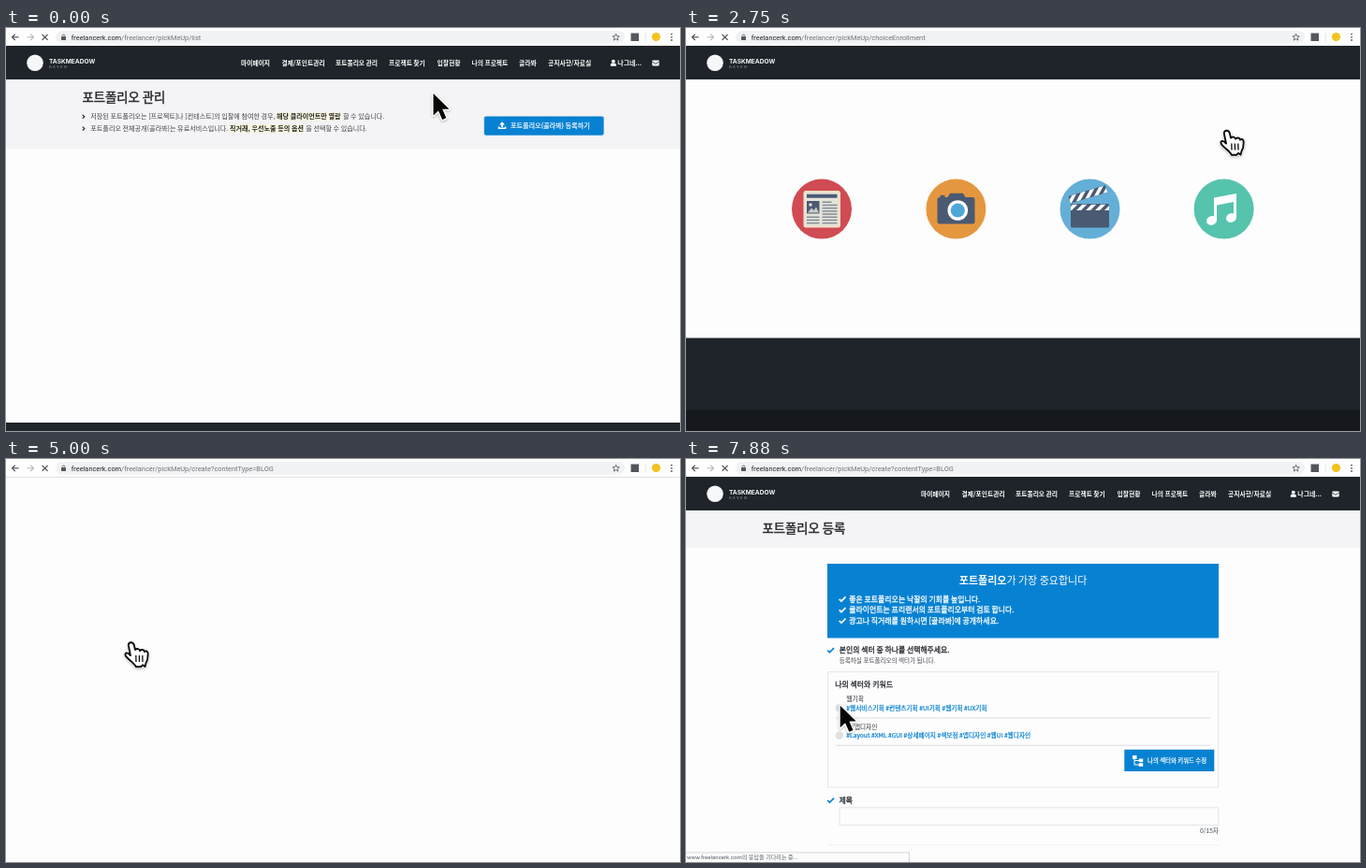
Recreate the animation shown at these times as an HTML page with a canvas. Size 720x431 px, loop 8 s.

```html
<!DOCTYPE html>
<html lang="ko">
<head>
<meta charset="utf-8">
<title>포트폴리오 등록</title>
<style>
html, body { margin: 0; width: 100%; height: 100%; overflow: hidden; background: #fdfdfe; }
canvas { display: block; width: 720px; height: 431px; }
</style>
</head>
<body>
<canvas id="stage"></canvas>
<script>
const W = 720, H = 431, LOOP = 8000, STEP = 125;
const KR = '"Noto Sans CJK KR", "Noto Sans CJK", sans-serif';
const UI = 'Roboto, "Noto Sans CJK KR", sans-serif';
const PAPER = '#fdfdfe', DARK = '#1e2429', BLUE = '#0782d2', INK = '#25282c', SLATE = '#4a5a73';

const canvas = document.getElementById('stage');
const c = canvas.getContext('2d');
const ratio = window.devicePixelRatio || 1;
canvas.width = W * ratio;
canvas.height = H * ratio;

// ---- helpers ----
function rect(x, y, w, h, fill, r = 0) {
  c.fillStyle = fill;
  c.beginPath();
  c.roundRect(x, y, w, h, r);
  c.fill();
}
function frame(x, y, w, h, color) {
  c.strokeStyle = color;
  c.lineWidth = 1;
  c.strokeRect(x, y, w, h);
}
function disc(x, y, r, fill) {
  c.fillStyle = fill;
  c.beginPath();
  c.arc(x, y, r, 0, 7);
  c.fill();
}
function line(color, width, ...p) {
  c.strokeStyle = color;
  c.lineWidth = width;
  c.beginPath();
  for (let i = 0; i < p.length; i += 2) c.lineTo(p[i], p[i + 1]);
  c.stroke();
}
function poly(fill, ...p) {
  c.fillStyle = fill;
  c.beginPath();
  for (let i = 0; i < p.length; i += 2) c.lineTo(p[i], p[i + 1]);
  c.closePath();
  c.fill();
}
// y is the optical middle of the line; returns the text width
function text(s, x, y, size, color = INK, weight = 400, align = 'left', family = KR) {
  c.font = `${weight} ${size}px ${family}`;
  c.textAlign = align;
  c.fillStyle = color;
  c.fillText(s, x, y + size * 0.38);
  if (weight === 500) { // no medium cut is installed: thicken the regular one
    c.strokeStyle = color;
    c.lineWidth = size * 0.035;
    c.strokeText(s, x, y + size * 0.38);
  }
  return c.measureText(s).width;
}
const chevron = (x, y, color) => line(color, 1.2, x - 1, y - 2, x + 1, y, x - 1, y + 2);
const check = (x, y, color) => line(color, 1.7, x - 3.3, y, x - 1, y + 2.3, x + 3.5, y - 2.4);
const clamp = v => Math.max(0, Math.min(1, v));
const ease = v => { v = clamp(v); return v * v * (3 - 2 * v); };

// ---- browser bar ----
function browser(path) {
  rect(0, 0, W, 19, '#fefefe');
  rect(53, 3, 608, 13.5, '#f0f2f4', 7);
  rect(0, 19, W, 1, '#dfe0e3');
  for (const [x, d, color] of [[10, 1, '#45494d'], [26, -1, '#b5b7ba']]) {
    line(color, 1.1, x - 3.5, 9.8, x + 3.5, 9.8);
    line(color, 1.1, x - 0.3 * d, 6.6, x - 3.4 * d, 9.8, x - 0.3 * d, 13);
  }
  line('#45494d', 1.1, 38.6, 6.8, 44.6, 12.8);
  line('#45494d', 1.1, 44.6, 6.8, 38.6, 12.8);
  rect(59, 9, 5, 4, '#55595d', 0.6);
  c.strokeStyle = '#55595d';
  c.lineWidth = 0.9;
  c.beginPath();
  c.arc(61.5, 8.6, 1.5, Math.PI, 0);
  c.stroke();
  const w = text('freelancerk.com', 69.7, 9.7, 7.42, '#202327', 400, 'left', UI);
  text('/freelancer/pickMeUp/' + path, 69.7 + w, 9.7, 7.42, '#70757a', 400, 'left', UI);
  c.strokeStyle = '#5c6064';
  c.lineWidth = 0.9;
  c.beginPath();
  for (let i = 0; i < 10; i++) {
    const a = i * Math.PI / 5 - Math.PI / 2, r = i % 2 ? 1.7 : 3.8;
    c.lineTo(651.6 + r * Math.cos(a), 10 + r * Math.sin(a));
  }
  c.closePath();
  c.stroke();
  rect(667.5, 5.5, 8.5, 8.5, '#54575b');
  rect(682.8, 5.5, 0.7, 9, '#d8dadd');
  disc(694.5, 9.6, 4.6, '#f3c21f');
  for (const y of [6.6, 9.8, 13]) disc(711, y, 0.9, '#505458');
}

function status(s, alpha = 1) {
  c.globalAlpha = alpha;
  rect(0, 420.5, 239, 11, '#c9cbce', 1);
  rect(0, 421.2, 238.2, 10, '#fcfcfd', 1);
  text(s + '의 응답을 기다리는 중...', 1, 426, 6.08, '#55585c', 400, 'left', UI);
  c.globalAlpha = 1;
}

// ---- site header and footer ----
const MENU = [['마이페이지', 251], ['결제/포인트관리', 294.5], ['포트폴리오 관리', 352], ['프로젝트 찾기', 409],
  ['입찰현황', 460.5], ['나의 프로젝트', 497.5], ['골라봐', 548], ['공지사항/자료실', 579]];

function header(nav) {
  rect(0, 19, W, 36, DARK);
  disc(31, 37.3, 8.8, '#f6f7f8');
  text('TASKMEADOW', 46, 35.4, 6.6, '#f4f5f6', 700, 'left', 'Inter, sans-serif');
  c.letterSpacing = '1.8px';
  text('HAVEN', 46, 41.4, 3.4, '#a9adb1', 400, 'left', 'Inter, sans-serif');
  c.letterSpacing = '0px';
  if (!nav) return;
  for (const [s, x] of MENU) text(s, x, 37.6, 6.75, '#fff', 700);
  disc(648.8, 35.6, 1.9, '#fff');
  rect(645.8, 37.6, 6, 3.2, '#fff', [1.8, 1.8, 0.5, 0.5]);
  text('나그네...', 653.3, 37.6, 6.9, '#fff', 700);
  rect(690.3, 34.6, 7.4, 5.8, '#fff', 0.8);
  line(DARK, 0.8, 690.3, 36, 694, 38.4, 697.7, 36);
}

const GREY = '#7d8185';

function footer(full) {
  rect(0, 331.4, W, 99.6, DARK);
  rect(0, 408.5, W, 22.5, '#15191d');
  if (!full) return;
  text('CONTACT', 164.5, 345.3, 7.3, '#f0f1f2', 700, 'center');
  text('"별빛일손나누리"는', 360, 345.3, 7.2, '#f0f1f2', 700, 'center');
  text('안심맡김계좌', 555.5, 345.3, 7.3, '#f0f1f2', 700, 'center');
  ['대표이사 : 도담솔', '주소 : 한별시 나래들구 푸른솔길로 5길21 3층', 'voc : 0000-0000(운영시간 10:00 ~ 17:00 한국시각)']
    .forEach((s, i) => {
      chevron(75, 361.8 + i * 9, GREY);
      text(s, 80, 361.8 + i * 9, 6.35, GREY);
    });
  ['별빛일손나누리는 법에 의해 보호받는 (주)가람나루이음결새벽들마루', '소리의 등록상표입니다.', '사업자등록번호 : 000-00-00000']
    .forEach((s, i) => text(s, 270, 361.8 + i * 9, 6.3, GREY));
  text('HN한들은행 000000-00-000000', 556, 361.8, 6.3, GREY, 400, 'center');
  text('계좌주 : (주)가람나루이음결새벽들마루소리', 556, 370.8, 6.3, GREY, 400, 'center');
  for (let i = 0; i < 4; i++) rect(336.5 + i * 13.5, 389, 8.5, 8.5, '#a4a7aa', 1);
  disc(81, 421, 6, '#63676b');
  text('TASKMEADOW', 92, 420.5, 5.6, '#63676b', 700, 'left', 'Inter, sans-serif');
  text('Copyright © 2019 GN Meadows & Brookside Co.,Ltd. All Rights Reserved', 356, 421.5, 5.7, '#565a5f', 400, 'right');
  for (const [s, x, mark] of [['에스크로서비스', 479, 521.5], ['개인정보보호정책', 528.5, 576.5], ['이용약관', 583, 609.5], ['회원탈퇴', 616.5, 644.5]]) {
    text(s, x, 421.5, 5.8, '#f0f1f2', 700);
    chevron(mark, 421.5, '#f0f1f2');
  }
}

// ---- pages ----
function listPage(hover) {
  rect(0, 55, W, 74.5, '#f4f3f5');
  header(true);
  text('포트폴리오 관리', 81.5, 74.2, 13.3, INK, 500);
  chevron(82.8, 94.8, INK);
  chevron(82.8, 107.6, INK);
  rect(288, 90.3, 70, 9, '#fcf7df');
  rect(238, 103, 80, 9, '#fcf7df');
  const body = '#3f4347';
  text('저장된 포트폴리오는 [프로젝트]나 [컨테스트]의 입찰에 참여한 경우,', 90.3, 94.6, 7.1, body);
  text('해당 클라이언트만 열람', 289, 94.6, 7.1, INK, 700);
  text('할 수 있습니다.', 360, 94.6, 7.1, body);
  text('포트폴리오 전체공개(골라봐)는 유료서비스입니다.', 90.3, 107.4, 7.1, body);
  text('직거래, 우선노출 등의 옵션', 239, 107.4, 7.1, INK, 700);
  text('을 선택할 수 있습니다.', 320.3, 107.4, 7.1, body);
  const mix = (a, b) => Math.round(a + (b - a) * hover);
  rect(510.8, 94.4, 127.8, 20.4, `rgb(${mix(7, 10)},${mix(130, 153)},${mix(210, 246)})`, 2);
  poly('#fff', 530, 100.3, 533, 103.6, 531, 103.6, 531, 106, 529, 106, 529, 103.6, 527, 103.6);
  line('#fff', 1.5, 526.5, 105.5, 526.5, 107.3, 533.5, 107.3, 533.5, 105.5);
  text('포트폴리오(골라봐) 등록하기', 539, 104.2, 7.1, '#fff', 500);
  rect(0, 422, W, 9, DARK);
}

function newsIcon() {
  rect(125.5, 174, 39.5, 39.5, '#efe0c4', 2.5);
  rect(127.5, 176, 35.5, 35.5, '#e6e3da', 1);
  rect(129, 177.8, 32.5, 4, SLATE);
  rect(129, 185, 13.5, 13.5, SLATE);
  disc(133, 189, 1.7, '#efe5d0');
  poly('#c9cbc8', 130, 197.5, 134, 192.5, 136.5, 195, 139, 191.5, 142, 197.5);
  for (let i = 0; i < 8; i++) {
    const y = 185.5 + i * 3.2;
    rect(145.5, y, i === 0 ? 10 : 16, 1.5, '#818c97');
    if (i > 4) rect(129, y, 13.5, 1.5, '#818c97');
  }
}
function cameraIcon() {
  rect(268.5, 181, 40, 28.5, SLATE, 2.5);
  poly(SLATE, 279, 182, 282, 176.8, 296, 176.8, 299, 182);
  rect(271.5, 178.8, 5, 3, SLATE);
  disc(290.3, 195, 10.8, '#fff');
  disc(290.3, 195, 7.6, '#4fa7d8');
}
function stripes(y, h) {
  c.save();
  c.beginPath();
  c.rect(0, y, 41, h);
  c.clip();
  for (let x = -4; x < 44; x += 10) poly('#fff', x, y + h, x + 5, y + h, x + 5 + h, y, x + h, y);
  c.restore();
}
function clapIcon() {
  rect(411, 188, 41, 25.5, SLATE, 1.5);
  c.save();
  c.translate(411, 188);
  stripes(0.5, 6.5);
  c.rotate(-0.29);
  rect(0, -8.5, 41, 8, SLATE, 1);
  stripes(-8.5, 8);
  c.restore();
}
function noteIcon() {
  poly('#fff', 564, 181.5, 588, 177, 588, 203, 585, 203, 585, 186, 567, 189.4, 567, 206, 564, 206);
  for (const [x, y] of [[561.5, 206], [582.5, 203]]) {
    c.fillStyle = '#fff';
    c.beginPath();
    c.ellipse(x, y, 5.6, 4.8, -0.35, 0, 7);
    c.fill();
  }
}
const KINDS = [['블로그 형식으로', 145, '#d04b53', newsIcon], ['이미지 위주로', 288.4, '#e5973f', cameraIcon],
  ['영상 위주로', 431.5, '#64afd8', clapIcon], ['음원 위주로', 574.6, '#56c3ad', noteIcon]];

function choicePage(full, icons) {
  header(full);
  footer(full);
  if (!icons) return;
  if (full) text('어떤 형태의 등록을 원하시나요', 360, 122, 14.55, INK, 500, 'center');
  for (const [label, x, color, icon] of KINDS) {
    disc(x, 193.6, 32, color);
    icon();
    if (full) text(label, x, 240, 10.5, INK, 500, 'center');
  }
}

function treeIcon(x, y) {
  rect(x - 5.5, y - 5.5, 4.5, 4, '#fff');
  rect(x + 1.2, y - 2, 4.5, 3.6, '#fff');
  rect(x + 1.2, y + 2.7, 4.5, 3.6, '#fff');
  line('#fff', 1, x - 3.5, y - 2, x - 3.5, y + 4.5, x + 1.5, y + 4.5);
  line('#fff', 1, x - 3.5, y, x + 1.5, y);
}

function createPage(nav, full, body) {
  rect(0, 55, W, 40, '#f4f3f5');
  header(nav);
  if (full) text('포트폴리오 등록', 81.5, 74.2, 13.3, INK, 500);
  if (!body) return;
  const dy = full ? 0 : 1;
  rect(151, 112 + dy * 0.6, 418, 79.5 + dy * 0.3, BLUE);
  frame(151.5, 227.7 + dy, 417, 123.3, '#e6e7e9');
  for (const y of [266, 295.5]) disc(163.8, y + dy, 4.2, '#dfe0e1');
  for (const y of [276.4, 305.8]) rect(159.5, y + dy, 401, 1, '#dddee0');
  const bx = full ? 468.3 : 471;
  rect(bx, 310.7 + dy, 564.3 - bx, 23.3, BLUE);
  treeIcon(bx + 14.2, 322.5 + dy);
  frame(164, 372.8 + dy, 404.7, 18.6, '#e4e5e7');
  rect(151, 412.4 + dy, 418, 0.9, '#ebecee');
  if (!full) return;

  const w = text('포트폴리오', 291.8, 129.5, 11, '#fff', 700);
  text('가 가장 중요합니다', 291.8 + w, 129.5, 11, '#fff', 400);
  ['좋은 포트폴리오는 낙찰의 기회를 높입니다.', '클라이언트는 프리랜서의 포트폴리오부터 검토 합니다.', '광고나 직거래를 원하시면 [골라봐]에 공개하세요.']
    .forEach((s, i) => {
      const y = 149.8 + i * 11.6;
      check(167, y, '#fff');
      text(s, 174.3, y, 7.9, '#fff', 500);
    });
  check(154.5, 204.6, BLUE);
  text('본인의 섹터 중 하나를 선택해주세요.', 163.8, 204.3, 7.87, INK, 500);
  text('등록하실 포트폴리오의 섹터가 됩니다.', 163.8, 215.8, 6.55, '#44484c');
  text('나의 섹터와 키워드', 159.3, 241, 7.9, INK, 500);
  text('웹기획', 171.3, 256.5, 6.8, INK);
  text('#웹서비스기획 #컨텐츠기획 #UI기획 #웹기획 #UX기획', 171.3, 266.2, 6.68, BLUE, 500);
  text('웹/앱디자인', 171.3, 286.2, 6.6, INK);
  text('#Layout #XML #GUI #상세페이지 #색보정 #앱디자인 #웹UI #웹디자인', 171.3, 295.7, 6.68, BLUE, 500);
  text('나의 섹터와 키워드 수정', 493, 322.3, 6.4, '#fff', 500);
  check(154.5, 365, BLUE);
  text('제목', 163.8, 364.8, 7.7, INK, 500);
  text('0/15자', 569, 397.3, 6.7, '#44484c', 400, 'right');
}

// ---- pointer ----
const ARROW = new Path2D('M0 0V23.5L5.4 18.4L9.6 28L13.8 26.2L9.7 16.8H17Z');
const HAND = new Path2D('M-3 3C-3.4-1 2-1.4 3 2.6L4.2 7.6C5.5 6 9 6.2 9.2 8.6C10.5 6.8 14 7.2 14.2 9.6' +
  'C15.5 8.2 18 9 17.9 12L17.4 17.4C17 20 15.2 21.2 15.2 24L14.6 25.6L12.2 23.8L10.2 25.8H5' +
  'C4 22-6 16.4-6.3 13.2C-6.8 10-3.4 10.2-.8 13.6Z');

function pointer(x, y, hand) {
  c.save();
  c.translate(x, y);
  c.lineJoin = 'round';
  c.shadowColor = 'rgba(0,0,0,.25)';
  c.shadowBlur = 2.5 * ratio;
  c.shadowOffsetY = ratio;
  const shape = hand ? HAND : ARROW;
  c.strokeStyle = '#fff';
  c.lineWidth = hand ? 3.4 : 3;
  c.stroke(shape);
  c.shadowColor = 'transparent';
  c.fillStyle = hand ? '#fff' : '#050505';
  c.fill(shape);
  if (hand) {
    c.strokeStyle = '#0a0a0a';
    c.lineWidth = 1.9;
    c.stroke(shape);
    for (const lx of [5, 8.5, 12]) line('#0a0a0a', 1.3, lx, 13.6, lx + 0.2, 20.4);
  }
  c.restore();
}

// start, end, target x, target y
const MOVES = [[0, 850, 577.8, 110], [2850, 3500, 133.8, 196.5], [6650, 7500, 167, 269], [7500, 7800, 164.7, 263.8]];

function pointerAt(t) {
  let x = 456.5, y = 70;
  for (const [from, to, tx, ty] of MOVES) {
    const k = ease((t - from) / (to - from));
    x += (tx - x) * k;
    y += (ty - y) * k;
  }
  return [x, y];
}

function draw(t) {
  c.setTransform(ratio, 0, 0, ratio, 0, 0);
  rect(0, 0, W, H, PAPER);
  browser(t < 1000 ? 'list' : t < 3750 ? 'choiceEnrollment' : 'create?contentType=BLOG');
  const [x, y] = pointerAt(t);
  let hand;
  if (t < 2250) {
    hand = x > 511 && y > 94;
    listPage(ease((t - 600) / 400));
    if (t >= 875) status(t < 1125 ? 'www.freelancerk.com' : 'in.hotjar.com');
  } else if (t < 5000) {
    hand = t < 2875 || Math.hypot(x - 145, y - 193.6) < 32;
    if (t >= 2375) choicePage(t >= 2875, t >= 2500);
    if (t >= 3625 && t < 4750) status('www.freelancerk.com', t < 4625 ? 1 : 0.5);
  } else {
    hand = t < 6750;
    if (t >= 5375) createPage(t >= 6125, t >= 6250, t >= 5500);
    if (t >= 5500) status('www.freelancerk.com');
  }
  pointer(x, y, hand);
}

const start = performance.now();
function tick() {
  const t = (performance.now() - start) % LOOP;
  draw(Math.floor(t / STEP) * STEP);
  requestAnimationFrame(tick);
}
tick();
</script>
</body>
</html>
```
